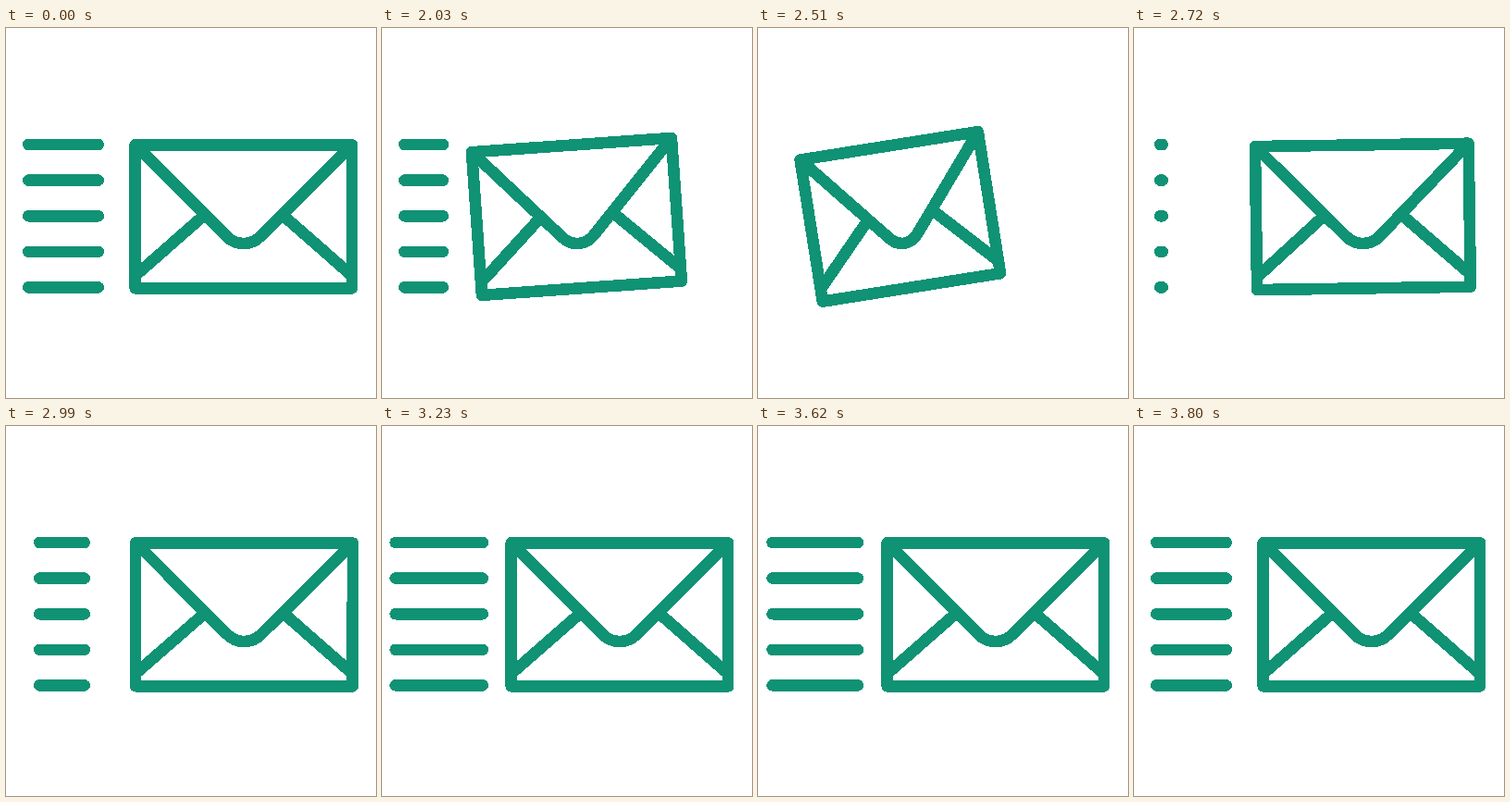
Write an HTML page that moves like this. It is 400 by 400 pixels and loops after 3.83 s.

```html
<!DOCTYPE html>
<html lang="en">
<head>
<meta charset="utf-8">
<title>Sending mail</title>
<style>
html, body { margin: 0; width: 100%; height: 100%; overflow: hidden; background: #fff; }
svg { display: block; width: 100vw; height: 100vh; shape-rendering: crispEdges; }
path {
  fill: none; stroke: #109274; stroke-width: 12.6; stroke-linejoin: round; stroke-linecap: round;
  vector-effect: non-scaling-stroke;
}
.fold { stroke-linecap: butt; }
</style>
</head>
<body>
<svg viewBox="0 0 400 400">
  <path id="lines"/>
  <g id="mail">
    <path d="M-117.2 -77.4H117.2V77.6H-117.2Z"/>
    <path d="M-117.2 -77.4L-18.1 21.7A25.6 25.6 0 0 0 18.1 21.7L117.2 -77.4"/>
    <path class="fold" d="M-43 -1L-116 63M43 -1L116 63"/>
  </g>
</svg>
<script>
const LOOP = 3830, STEP = 30, OUT = 2000, BACK = 2600;
const CENTER = { x: 256.8, y: 203.8 };
const ROWS = [126, 164.6, 203.2, 241.8, 280.4];
const REST = [24.3, 99.7];
// time, left end, right end of the speed lines while they spring back
const SPRING = [
  [2690, 24, 25], [2720, 28.3, 30.7], [2870, 14.3, 108], [2990, 36.3, 84.7],
  [3215, 14.3, 109], [3440, 39.2, 87], [3650, 14.3, 109], [3800, ...REST]
];
const mail = document.getElementById('mail');
const lines = document.getElementById('lines');

const bump = u => Math.sin(Math.PI * Math.min(1, Math.max(0, u)));

// 0 = at rest, 1 = pulled fully back to the left
function pull(t) {
  if (t < OUT + STEP) return 0;
  if (t < BACK) {
    const n = (t - OUT) / STEP;
    return 1 - 0.55 ** n + 0.02 * bump((n - 2) / 15);
  }
  const n = (t - BACK) / STEP;
  return 0.55 ** n - 0.007 * bump((n - 4) / 18);
}

function lineEnds(t, p) {
  if (t < BACK) return p < 0.96 ? [REST[0], REST[1] - (REST[1] - REST[0]) * p] : null;
  if (t < SPRING[0][0]) return null;
  const i = SPRING.findIndex(k => k[0] >= t);
  if (i < 0) return REST;
  if (i === 0) return SPRING[0].slice(1);
  const a = SPRING[i - 1], b = SPRING[i];
  const u = (t - a[0]) / (b[0] - a[0]);
  const e = (1 - Math.cos(Math.PI * u)) / 2;
  return [1, 2].map(k => a[k] + (b[k] - a[k]) * e);
}

function draw(time) {
  const t = OUT + Math.floor((time % LOOP - OUT) / STEP) * STEP;
  const p = pull(t);
  mail.setAttribute('transform',
    `translate(${CENTER.x - 103 * p} ${CENTER.y}) rotate(${-9 * p}) scale(${1 - 0.17 * p} 1)`);
  const ends = lineEnds(t, p);
  lines.setAttribute('d', ends ? ROWS.map(y => `M${ends[0]} ${y}H${ends[1]}`).join('') : '');
}

const start = performance.now();
function tick() {
  draw(performance.now() - start);
  requestAnimationFrame(tick);
}
tick();
</script>
</body>
</html>
```
